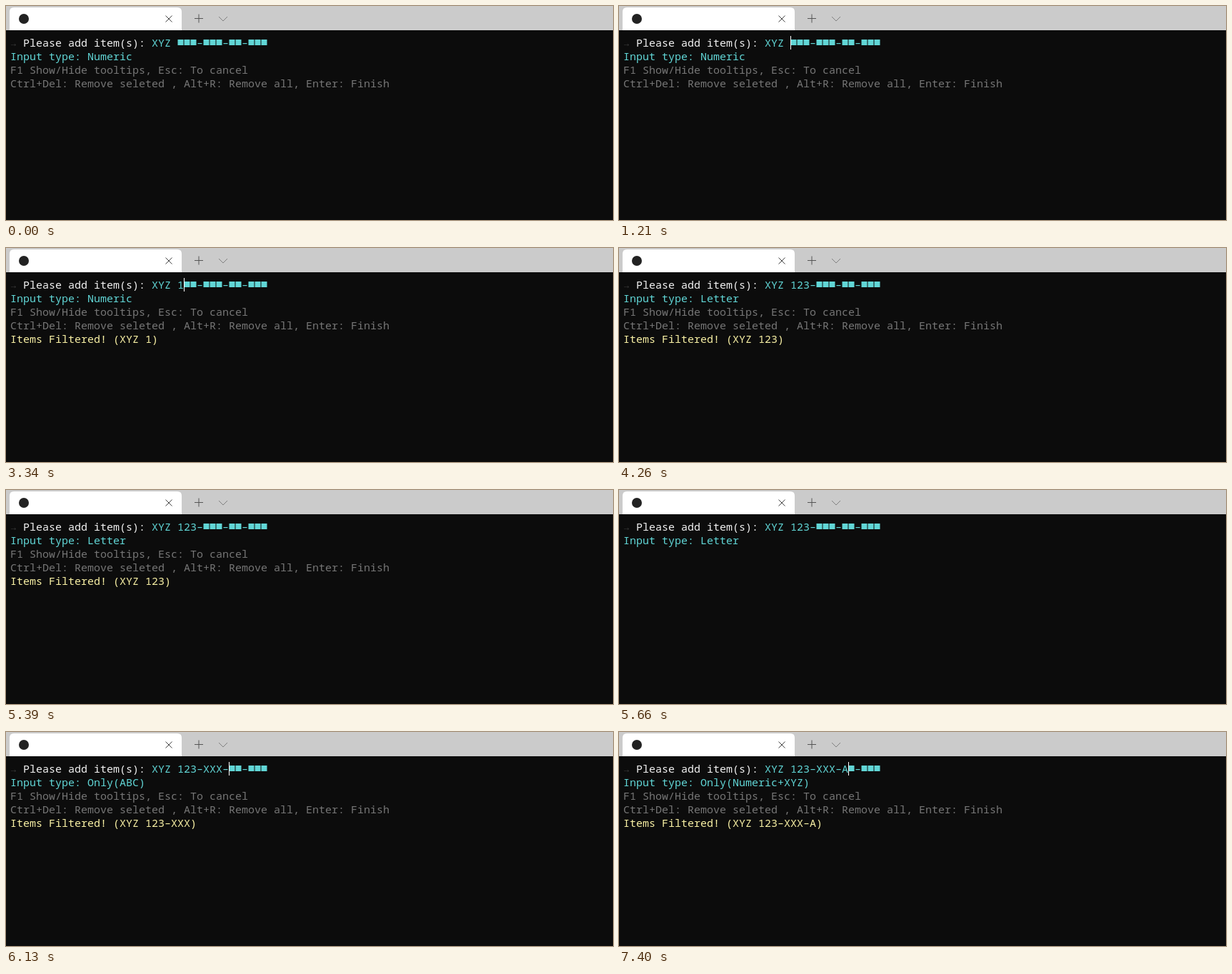
Recreate the animation shown at these times as an HTML page. Size 850 px wide and 300 px high, loop 8000 ms.

```html
<!DOCTYPE html>
<html lang="en">
<head>
<meta charset="utf-8">
<title>Masked list input</title>
<style>
  html, body { margin: 0; width: 100%; height: 100%; overflow: hidden; background: #0c0c0c; }
  svg { display: block; width: 850px; height: 300px; }
  text { font: 500 15px "Noto Sans Mono", "DejaVu Sans Mono", monospace; white-space: pre; font-variant-ligatures: none; }
  .arrow { fill: #343434; }
  .prompt { fill: #f2f2f2; }
  .cyan { fill: #61d6d6; }
  .hint { fill: #767676; }
  .notice { fill: #f9f1a5; }
  .icon { fill: none; stroke-width: 1; }
</style>
</head>
<body>
<svg viewBox="0 0 850 300">
  <rect width="850" height="300" fill="#0c0c0c"/>
  <rect width="850" height="34" fill="#cbcbcb"/>
  <path d="M5 34V8Q5 2 11 2H240Q246 2 246 8V34Z" fill="#fff"/>
  <circle cx="25" cy="18" r="7" fill="#222"/>
  <path class="icon" stroke="#444" d="M223.5 13.5l9 9m0-9l-9 9"/>
  <path class="icon" stroke="#555" d="M264 17.5h12m-6-6v12"/>
  <path class="icon" stroke="#808080" d="M298 15l6 6 6-6"/>

  <text class="arrow" x="6" y="57">→</text>
  <text class="prompt" x="24" y="57">Please add item(s):</text>
  <text class="cyan" id="value" x="204" y="57"></text>
  <g class="cyan" id="blanks"></g>
  <text class="cyan" id="kind" x="6" y="76"></text>
  <g class="hint" id="hints">
    <text x="6" y="95">F1 Show/Hide tooltips, Esc: To cancel</text>
    <text x="6" y="114">Ctrl+Del: Remove seleted , Alt+R: Remove all, Enter: Finish</text>
  </g>
  <text class="notice" id="notice" x="6" y="133"></text>
  <rect id="caret" y="42" width="1" height="19" fill="#fff"/>
</svg>
<script>
const LOOP = 8000, CELL = 9, VALUE_X = 204;
const MASK = 'XYZ ■■■-■■■-■■-■■■';
const KINDS = ['Numeric', 'Letter', 'Only(ABC)', 'Only(Numeric+XYZ)'];

// time, typed text, kind, filter shown in the notice, caret on, hints on
const STEPS = [
  [0,    '',         0, '',        0, 1],
  [1210, '',         0, '',        1, 1],
  [1740, '',         0, '',        0, 1],
  [2270, '',         0, '',        1, 1],
  [2800, '',         0, '',        0, 1],
  [3270, '1',        0, '',        1, 1],
  [3340, '1',        0, '1',       1, 1],
  [3470, '12',       0, '12',      1, 1],
  [3600, '123-',     1, '123',     1, 1],
  [4260, '123-',     1, '123',     0, 1],
  [4790, '123-',     1, '123',     1, 1],
  [5390, '123-',     1, '123',     0, 1],
  [5660, '123-',     1, '',        0, 0],
  [5730, '123-X',    1, '123-X',   1, 1],
  [5930, '123-XX',   1, '123-XX',  1, 1],
  [6130, '123-XXX-', 2, '123-XXX', 1, 1],
  [6860, '123-XXX-', 2, '123-XXX', 0, 1],
  [7330, '123-XXX-A', 3, '123-XXX', 1, 1],
  [7400, '123-XXX-A', 3, '123-XXX-A', 1, 1],
];

const el = id => document.getElementById(id);
const wideDash = s => s.replace(/-/g, '–');
const show = (node, on) => node.setAttribute('visibility', on ? 'visible' : 'hidden');

const blanks = [...MASK].map((c, i) => {
  if (c !== '■') return null;
  const box = document.createElementNS('http://www.w3.org/2000/svg', 'rect');
  const attrs = { x: VALUE_X + i * CELL + 0.5, y: 47, width: 8, height: 8 };
  for (const key in attrs) box.setAttribute(key, attrs[key]);
  return el('blanks').appendChild(box);
});

function render([, typed, kind, filter, caret, hints]) {
  const filled = 4 + typed.length;
  const line = 'XYZ ' + typed + MASK.slice(filled);
  el('value').textContent = wideDash(line.replace(/■/g, '\u00a0'));
  blanks.forEach((box, i) => box && show(box, i >= filled));
  el('kind').textContent = 'Input type: ' + KINDS[kind];
  el('notice').textContent = filter && wideDash(`Items Filtered! (XYZ ${filter})`);
  el('caret').setAttribute('x', VALUE_X + filled * CELL);
  show(el('caret'), caret);
  show(el('hints'), hints);
}

const start = performance.now();
let current;
function tick() {
  const t = (performance.now() - start) % LOOP;
  const step = STEPS.findLast(s => s[0] <= t);
  if (step !== current) render(current = step);
  requestAnimationFrame(tick);
}
tick();
</script>
</body>
</html>
```
